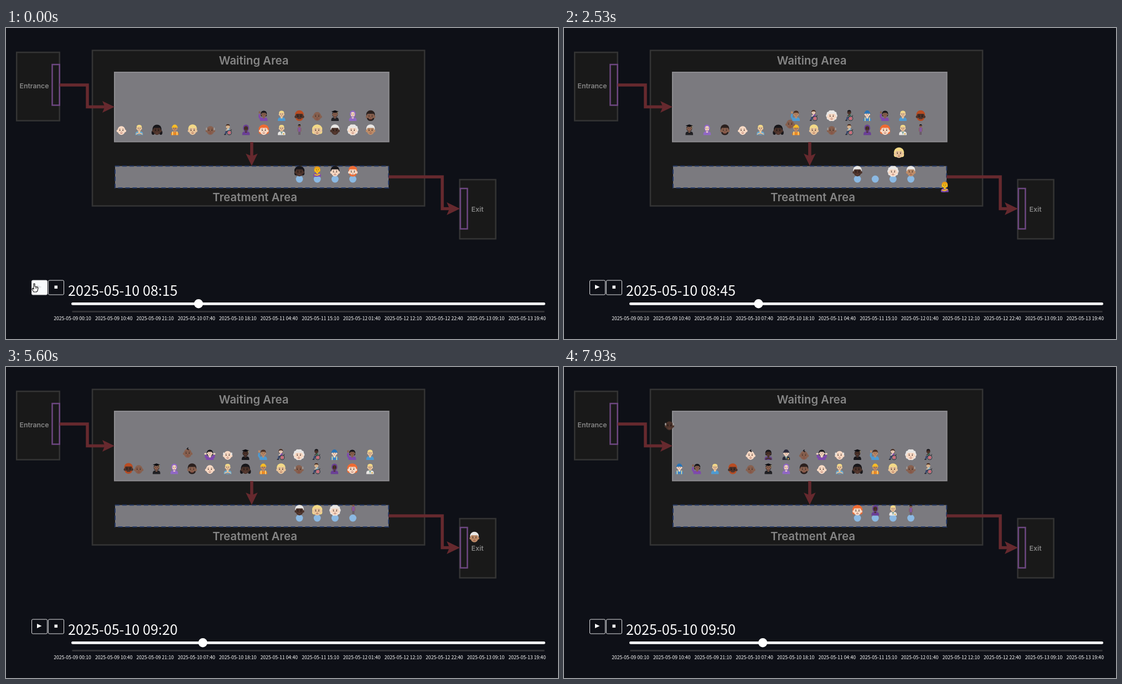
Recreate the animation shown at these times as an HTML page with a canvas. Size 997x562 px, loop 8000 ms.

```html
<!DOCTYPE html>
<html lang="en">
<head>
<meta charset="utf-8">
<title>Waiting room simulation</title>
<style>
html, body { margin: 0; width: 100%; height: 100%; overflow: hidden; background: #0e1017; }
canvas { display: block; width: 997px; height: 562px; }
</style>
</head>
<body>
<canvas id="stage" width="997" height="562"></canvas>
<script>
const ctx = document.getElementById('stage').getContext('2d');
const TAU = Math.PI * 2;
const LOOP = 8000, TICK = 200 / 3, MOVE = 420, SLIDE = 150;
const SANS = '"Noto Sans CJK JP", "Noto Sans CJK SC", "Noto Sans", sans-serif';
const ROUND = 'Inter, "Open Sans", sans-serif';

// ---------- simulation ----------
const starts = [195, 610, 1040, 1460, 1866, 2300, 2720, 3130, 3530, 3977,
  4385, 4799, 5192, 5620, 6040, 6461, 6862, 7267, 7687];
// per step: arrivals, then the bed taken by each next patient in line
const steps = [[2], [2], [1, 3], [0], [0, 2, 0], [0, 1], [0], [0], [0], [1],
  [0], [2], [1, 3], [1, 2], [1, 0], [1, 1], [0], [0], [1]];
const states = [{ head: 0, tail: 22, beds: [35, 36, 37, 38] }];
for (const [arrivals, ...taken] of steps) {
  const s = states[states.length - 1];
  const beds = s.beds.slice();
  taken.forEach((bed, i) => { beds[bed] = s.head + i; });
  states.push({ head: s.head + taken.length, tail: s.tail + arrivals, beds });
}

const ENTRANCE = [28, 29];
const bedX = i => 530 + 32.15 * i;

function place(id, s) {
  const bed = s.beds.indexOf(id);
  if (bed >= 0) return [bedX(bed), 259];
  if (id < s.head || id >= s.tail) return null;
  const i = id - s.head;
  return [658.5 - 32.15 * (i % 15), i < 15 ? 184 : 158.5];
}

// ---------- drawing helpers ----------
function oval(x, y, rx, ry, color, from = 0, to = TAU) {
  ctx.fillStyle = color;
  ctx.beginPath();
  ctx.ellipse(x, y, rx, ry, 0, from, to);
  ctx.fill();
}

function ring(x, y, r, color, width) {
  ctx.beginPath();
  ctx.arc(x, y, r, 0, TAU);
  ctx.strokeStyle = color;
  ctx.lineWidth = width;
  ctx.stroke();
}

function box(x, y, w, h, fill, stroke, line = 2.5, r = 0) {
  ctx.beginPath();
  ctx.roundRect(x, y, w, h, r);
  if (fill) { ctx.fillStyle = fill; ctx.fill(); }
  if (stroke) { ctx.strokeStyle = stroke; ctx.lineWidth = line; ctx.stroke(); }
}

function trace(points) {
  ctx.beginPath();
  for (let i = 0; i < points.length; i += 2) ctx.lineTo(points[i], points[i + 1]);
}

function line(color, width, ...points) {
  trace(points);
  ctx.strokeStyle = color;
  ctx.lineWidth = width;
  ctx.stroke();
}

function shape(color, ...points) {
  trace(points);
  ctx.fillStyle = color;
  ctx.fill();
}

function text(str, x, y, font, color, align = 'center') {
  ctx.font = font;
  ctx.fillStyle = color;
  ctx.textAlign = align;
  ctx.fillText(str, x, y);
}

// ---------- people ----------
const SKIN = ['#f8d9c4', '#e9c49b', '#bd8c68', '#87604f', '#4b332b', '#fcc21b'];
const BLACK = '#17161a', WHITE = '#e9e7e5', BLOND = '#f2d987', GINGER = '#ee6b33';
const VIOLET = '#7e49ad', BLUE = '#4d9bd3', GRAY = '#a09b98', BROWN = '#4a2f22';

// kind, skin, hair, hair style, clothes, extra
const people = [
  ['head', 2, WHITE, 'short'],
  ['head', 0, WHITE, 'curly'],
  ['head', 4, WHITE, 'short'],
  ['head', 1, BLOND, 'bob'],
  ['tall', 3, BLACK, 'short', '#84589c'],
  ['bust', 1, BLOND, 'short', WHITE, 'coat'],
  ['head', 0, GINGER, 'bob'],
  ['bust', 4, BLACK, 'hijab', '#6a3f96'],
  ['wheel', 1, BROWN, 'short', '#8fc0d8'],
  ['head', 3, GRAY, 'sides'],
  ['head', 1, BLOND, 'short'],
  ['bust', 2, '#f9bd25', 'hat', '#ee8a20', 'vest'],
  ['head', 4, BLACK, 'tails'],
  ['bust', 1, BLOND, 'short', '#69acd4', 'cross'],
  ['head', 0, null, 'bald'],
  ['head', 3, '#2a201e', 'beard'],
  ['bust', 0, BLACK, 'hijab', '#9068c5'],
  ['bust', 3, BLACK, 'grad', '#202024'],
  ['head', 3, null, 'bald'],
  ['head', 4, '#b94c22', 'beard'],
  ['bust', 1, BLOND, 'short', BLUE],
  ['bust', 3, BLACK, 'bob', VIOLET, 'raise'],
  ['bust', 0, '#2874b8', 'hat', '#3e86c9', 'vest'],
  ['wheel', 4, BLACK, 'short', '#3c755c'],
  ['head', 0, WHITE, 'curly'],
  ['wheel', 0, BROWN, 'bob', VIOLET],
  ['bust', 2, BROWN, 'short', BLUE, 'raise'],
  ['bust', 4, BLACK, 'grad', '#17171b'],
  ['head', 0, WHITE, 'sides'],
  ['bust', 0, BLACK, 'bob', VIOLET, 'shrug'],
  ['head', 3, BLACK, 'baby'],
  ['bust', 0, '#29283a', 'hat', '#292938', 'coat'],
  ['bust', 4, BLACK, 'bob', '#64438c', 'cross'],
  ['head', 0, BLACK, 'baby'],
  ['head', 4, GRAY, 'sides'],
  ['head', 4, BLACK, 'bob'],
  ['bust', 5, '#e69a17', 'bob', VIOLET, 'belly'],
  ['head', 0, BLACK, 'short'],
  ['head', 0, GINGER, 'beard']
];

function face(x, y, size, skinId, hair, style, top) {
  const skin = SKIN[skinId];
  const ink = skinId > 3 ? '#160f0d' : '#3d2a24';
  ctx.save();
  ctx.translate(x, y);
  ctx.scale(size, size);
  if (style === 'bob') {
    oval(0, -1, 9.2, 8.8, hair);
    box(-9.2, -1, 18.4, 8.5, hair, null, 0, 4);
  } else if (style === 'curly') {
    for (let a = 0; a < 10; a++) oval(6.6 * Math.cos(a * TAU / 10), 6.6 * Math.sin(a * TAU / 10), 3.6, 3.4, hair);
  } else if (style === 'tails') {
    oval(-7, 5, 2.8, 4, hair);
    oval(7, 5, 2.8, 4, hair);
    oval(0, -1, 8.2, 8.3, hair);
  } else if (style === 'hijab') {
    oval(0, 0, 9, 10.5, top);
  } else if (style === 'short' || style === 'beard') {
    oval(0, -2, 7.8, 7.8, hair);
  } else if (style === 'grad') {
    oval(0, 1, 8.5, 9, hair);
  }
  if (style !== 'hijab') {
    oval(-7, 2, 1.7, 2.2, skin);
    oval(7, 2, 1.7, 2.2, skin);
  }
  oval(0, 1.2, style === 'hijab' ? 6 : 7, style === 'hijab' ? 7 : 8, skin);
  if (style === 'beard') {
    oval(0, 4.2, 6.6, 5.2, hair, 0, Math.PI);
    oval(0, 4.6, 3.6, 2.2, skin);
  }
  if (['short', 'beard', 'bob', 'tails', 'curly'].includes(style)) oval(0, -3.6, 7.2, 5.6, hair, Math.PI, TAU);
  if (style === 'sides') {
    oval(-7, -1.6, 1.3, 2.6, hair);
    oval(7, -1.6, 1.3, 2.6, hair);
  }
  if (style === 'hat') {
    oval(0, -2.5, 8, 8, hair, Math.PI, TAU);
    box(-9.5, -3.5, 19, 2.4, hair, null, 0, 1);
  }
  if (style === 'grad') {
    shape('#0d0d11', 0, -11, 11, -7, 0, -3, -11, -7);
    line('#b59643', 1, 8, -7, 8, 0);
  }
  if (style === 'baby') line(hair, 1.6, 1, -9, -1, -7, 2, -5);
  oval(-2.8, 1, 0.9, 1.1, ink);
  oval(2.8, 1, 0.9, 1.1, ink);
  line(ink, 0.6, -4.2, -1.2, -1.7, -1.4);
  line(ink, 0.6, 1.7, -1.4, 4.2, -1.2);
  oval(0, 3.3, 1.2, 0.8, 'rgba(110,50,30,.4)');
  line(skinId > 3 ? '#7a4a40' : '#8d4038', 0.9, -2, 5.6, 0, 6.2, 2, 5.6);
  ctx.restore();
}

function bust(skinId, hair, style, top, extra) {
  const skin = SKIN[skinId];
  if (extra === 'shrug') {
    line(top, 4, -3, 7, -7, 4, -7, 0);
    line(top, 4, 3, 7, 7, 4, 7, 0);
    oval(-8, -1.5, 2.2, 1.4, skin);
    oval(8, -1.5, 2.2, 1.4, skin);
  }
  if (extra === 'raise') {
    line(top, 3.2, -5, 7, -8, 2, -7.5, -3);
    oval(-7.5, -6, 1.7, 2.3, skin);
  }
  box(-6.8, 3, 13.6, 6.6, top, null, 0, [4.5, 4.5, 0.5, 0.5]);
  box(-1.8, 1, 3.6, 4, skin, null, 0, 1);
  face(0, -3.2, 0.6, skinId, hair, style, top);
  if (extra === 'cross') {
    line(skin, 2.2, -5.5, 8, 0, 6.2, 5.5, 8);
    line('rgba(30,20,60,.5)', 0.8, -5, 9.2, 0, 7.4, 5, 9.2);
  } else if (extra === 'coat') {
    shape('#80a79d', -2, 3, 2, 3, 0, 9);
    box(2.5, 6, 2.4, 2.5, '#d9ae4d');
  } else if (extra === 'vest') {
    line('#f6e394', 1.5, -4, 3, -4, 9.6);
    line('#f6e394', 1.5, 4, 3, 4, 9.6);
  } else if (extra === 'belly') {
    oval(-2, 7, 5, 3, top);
    line(skin, 2, 5, 5, 0, 7, -5, 6);
  }
}

function wheel(skinId, hair, style, top) {
  line('#3d3d43', 1.2, 6, -1, 4, 4, -3, 4);
  line(top, 4, 0, -3, 1, 3);
  line('#34456f', 2.4, 1, 3, -4, 3.5, -5, 8);
  box(-7.5, 7.5, 3.6, 1.8, '#2a2a30', null, 0, 1);
  oval(2, 5, 3.6, 3.6, '#c9c4c8');
  ring(2, 5, 3.9, '#2f2f36', 1.2);
  ring(2, 5, 1.8, '#c8394c', 1.4);
  line(SKIN[skinId], 1.5, 0, -2, -4, 1);
  face(-0.5, -6.2, 0.42, skinId, hair, style, top);
}

function tall(skinId, hair, style, top) {
  line('#665563', 1.6, -1, 3, -1, 9);
  line('#665563', 1.6, 1, 3, 1, 9);
  line(SKIN[skinId], 1.2, -2.8, -3.5, -2.8, 3);
  line(SKIN[skinId], 1.2, 2.8, -3.5, 2.8, 3);
  box(-2.4, -5, 4.8, 8.5, top, null, 0, 1.5);
  face(0, -7, 0.3, skinId, hair, style, top);
}

const kinds = { bust, wheel, tall, head: (...look) => face(0, 0, 1, ...look) };

function person(id, x, y) {
  const [kind, ...look] = people[id];
  ctx.save();
  ctx.translate(x, y);
  kinds[kind](...look);
  ctx.restore();
}

// ---------- scene ----------
const PANEL = '#191919', EDGE = '#343434', DOOR = '#6d4781', ARROW = '#66292e', LABEL = '#858585';

function floorPlan() {
  box(156, 40.5, 600, 281, PANEL, EDGE);
  box(19.2, 44, 77.5, 123.5, PANEL, EDGE);
  box(819.5, 274, 65, 107, PANEL, EDGE);
  box(83.5, 66, 13.2, 73.5, null, DOOR);
  box(820.7, 290, 12.6, 73, null, DOOR);
  box(196, 80, 495.5, 125.4, '#7b7a7f', '#8d8c90', 2);
  box(197, 249.5, 494, 39.5, '#7b7a7f');
  ctx.setLineDash([8, 5]);
  box(197, 249.5, 494, 39.5, null, '#263a66', 2);
  ctx.setLineDash([]);

  line(ARROW, 5.5, 97, 103, 147, 103, 147, 142.5, 180, 142.5);
  shape(ARROW, 196, 142.5, 174, 132, 178.5, 142.5, 174, 153);
  line(ARROW, 5.5, 443.8, 206, 443.8, 232);
  shape(ARROW, 443.8, 249, 433, 227, 443.8, 231.5, 454.5, 227);
  line(ARROW, 5.5, 691, 269, 788, 269, 788, 326.5, 801, 326.5);
  shape(ARROW, 820, 326.5, 796, 315, 801, 326.5, 796, 338);

  text('Waiting Area', 447.5, 66, '600 20.4px ' + ROUND, LABEL);
  text('Treatment Area', 449.5, 312.5, '600 20.4px ' + ROUND, LABEL);
  text('Entrance', 51, 108.5, '600 12.3px ' + ROUND, LABEL);
  text('Exit', 851.5, 332, '600 12.3px ' + ROUND, LABEL);
  for (let i = 0; i < 4; i++) oval(bedX(i), 273, 6.4, 6.4, '#8bb9e3');
}

const stamp = min => new Date(Date.UTC(2025, 4, 9, 0, 10 + min)).toISOString().slice(0, 16).replace('T', ' ');

function controls(index, knob, hover) {
  box(46.5, 456, 28, 26, hover ? '#f8fafc' : null, '#dfe0e3', 1, 2);
  shape(hover ? '#e3e5e8' : '#fff', 56, 464, 64.5, 468, 56, 472);
  box(76.5, 456, 28, 26, null, '#dfe0e3', 1, 2);
  box(87.5, 465.5, 5.5, 5.5, '#fff');
  text(stamp(index * 5), 112, 483.5, '25.2px ' + SANS, '#fafafa', 'left');
  box(119.5, 511, 853, 3, '#323236');
  box(118, 496, 856, 4.8, '#fff', null, 0, 2.4);
  oval(119.5 + 0.5929 * knob, 498.3, 8.2, 8.2, '#fff');
  for (let i = 0; i < 12; i++) text(stamp(i * 630), 120 + 74.65 * i, 528.3, '500 8.6px ' + SANS, '#fff');
}

function hand(x, y) {
  ctx.save();
  ctx.translate(x, y);
  ctx.lineJoin = 'round';
  trace([-2, -7, 0, -7, 0, -2, 5, -1, 6, 1, 5, 6, 3, 8, -2, 8, -5, 3, -4, 1, -2, 3]);
  ctx.closePath();
  ctx.fillStyle = '#fff';
  ctx.fill();
  ctx.strokeStyle = '#111';
  ctx.lineWidth = 1.1;
  ctx.stroke();
  line('#111', 0.8, 1.5, -1, 1.5, 2);
  line('#111', 0.8, 3.5, -1, 3.5, 2);
  ctx.restore();
}

function crowd(k, p) {
  const from = states[Math.max(k, 0)], to = states[k + 1];
  for (let id = 0; id < people.length; id++) {
    const a = place(id, from), b = place(id, to);
    if (!a && !b) continue;
    const [ax, ay] = a || ENTRANCE;
    const [bx, by] = b || [ax + 226, ay + 50];
    person(id, ax + (bx - ax) * p, ay + (by - ay) * p);
  }
}

function draw(t) {
  const k = starts.filter(s => s <= t).length - 1;
  const since = k < 0 ? 0 : t - starts[k];
  const index = 386 + k;
  ctx.fillStyle = '#0e1017';
  ctx.fillRect(0, 0, 997, 562);
  floorPlan();
  crowd(k, Math.min(1, since / MOVE));
  const knob = k < 0 ? index : index - 1 + Math.min(1, since / SLIDE);
  controls(index, knob, t < 300);
  if (t < 600) {
    const away = Math.max(0, t - 200) / 400;
    hand(52 + 12 * away, 469 + 75 * away);
  }
}

function frame(now) {
  const t = now % LOOP;
  draw(Math.floor((t + 5) / TICK) * TICK % LOOP);
  requestAnimationFrame(frame);
}
requestAnimationFrame(frame);
</script>
</body>
</html>
```
